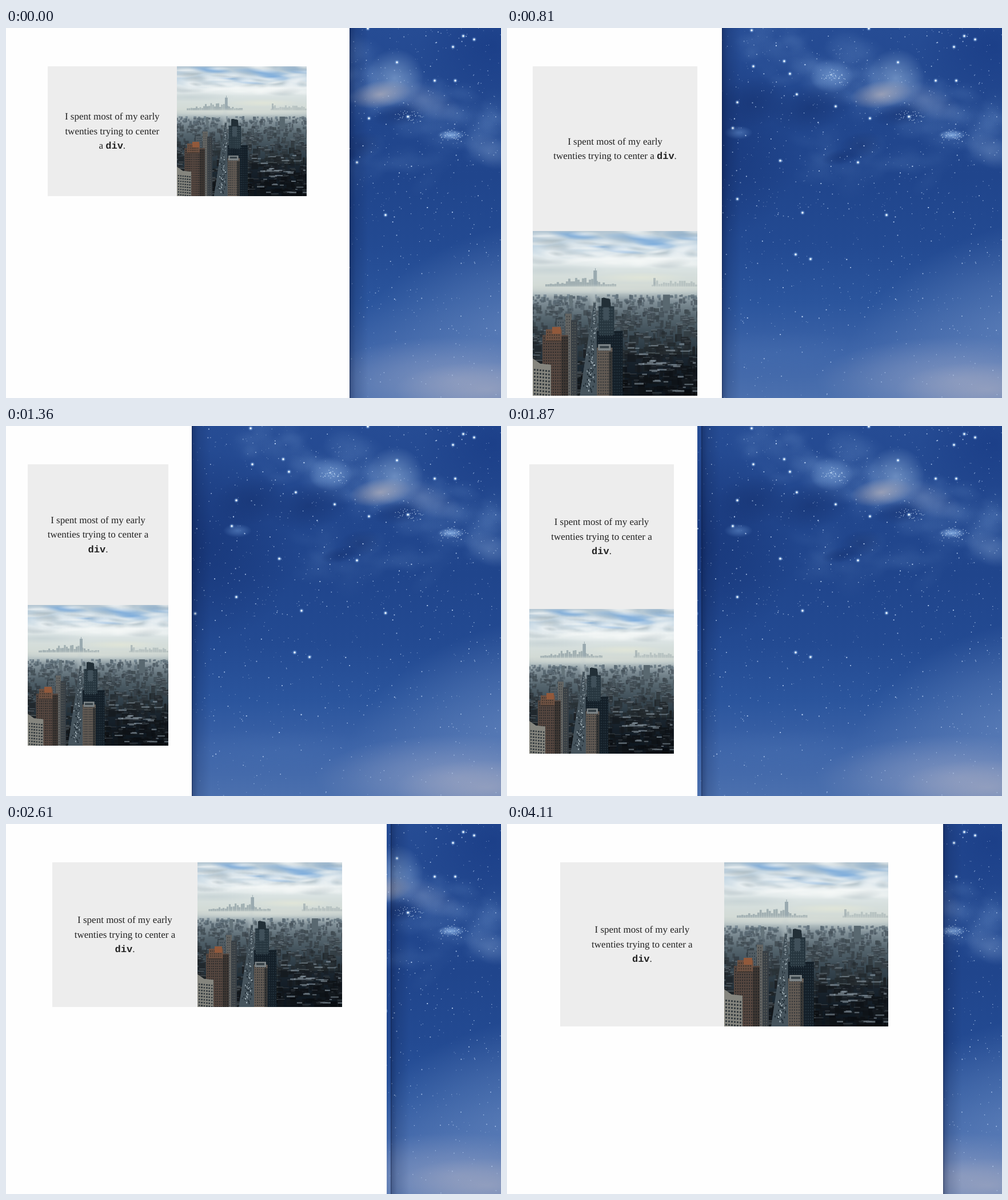
An HTML page with a canvas that plays this animation: 866 px wide and 647 px high, repeating every 4320 ms.

```html
<!DOCTYPE html>
<html lang="en">
<head>
<meta charset="utf-8">
<style>
  html, body { margin: 0; width: 100%; height: 100%; overflow: hidden; }
  #stage { position: relative; width: 866px; height: 647px; overflow: hidden; }
  #stage > *, #page > * { position: absolute; }
  #shadow {
    top: 0; width: 33px; height: 647px;
    background: linear-gradient(90deg, rgba(6,16,50,.65), rgba(6,16,50,.32) 2px, rgba(6,16,50,.14) 11px, transparent);
  }
  #page { left: 0; top: 0; height: 647px; overflow: hidden; background: #fefefe; }
  #card {
    display: flex; align-items: center; justify-content: center;
    background: #ededed; color: #222;
    font: 17px/25.5px "Liberation Serif", Times, serif;
    text-align: center; text-rendering: geometricPrecision;
  }
  #card p { margin: 0; width: 75%; }
  code { font: bold 17px/1 "Liberation Mono", Courier, monospace; }
  #track { top: 0; right: 0; width: 9px; height: 647px; background: #fafafa; border-left: 1px solid #e8e8e8; }
  #thumb { position: absolute; left: 2px; top: -4px; width: 6px; border-radius: 3px; background: #bcc2c2; }
</style>
</head>
<body>
<div id="stage">
  <canvas id="sky" width="866" height="647"></canvas>
  <div id="shadow"></div>
  <div id="page">
    <div id="card"><p>I spent most of my early twenties trying to center a <code>div</code>.</p></div>
    <canvas id="city" width="574" height="574"></canvas>
    <div id="track"><div id="thumb"></div></div>
  </div>
</div>
<script>
const $ = id => document.getElementById(id);

function seeded(s) {
  return () => (s = (s * 16807) % 2147483647) / 2147483647;
}

function fade(c, h, stops) {
  const g = c.createLinearGradient(0, 0, 0, h);
  stops.forEach(([y, color]) => g.addColorStop(y / h, color));
  return g;
}

// Soft ellipse; rgb is "r,g,b"
function glow(c, x, y, rx, ry, rgb, alpha, turn = 0) {
  const g = c.createRadialGradient(0, 0, 0, 0, 0, 1);
  g.addColorStop(0, `rgba(${rgb},${alpha})`);
  g.addColorStop(.5, `rgba(${rgb},${alpha * .55})`);
  g.addColorStop(1, `rgba(${rgb},0)`);
  c.save();
  c.translate(x, y);
  c.rotate(turn);
  c.scale(rx, ry);
  c.fillStyle = g;
  c.fillRect(-1, -1, 2, 2);
  c.restore();
}

function box(c, x, y, w, h, color) {
  c.fillStyle = color;
  c.fillRect(x, y, w, h);
}

function shape(c, color, ...p) {
  c.fillStyle = color;
  c.beginPath();
  for (let i = 0; i < p.length; i += 2) c.lineTo(p[i], p[i + 1]);
  c.fill();
}

function paintSky(c) {
  const rnd = seeded(77), spread = () => rnd() + rnd() - 1;
  box(c, 0, 0, 866, 647, fade(c, 647, [
    [0, "#264c94"], [130, "#22478e"], [260, "#20458c"], [380, "#234a92"],
    [480, "#2b559d"], [570, "#3d64a8"], [647, "#4b70ae"]]));
  glow(c, 340, 210, 170, 170, "20,48,112", .6);
  glow(c, 850, 30, 130, 100, "22,56,130", .6);

  // Milky way: puffs along a falling diagonal
  for (let i = 0; i < 150; i++) {
    const u = rnd();
    glow(c, 420 + u * 450, 20 + u * 170 + spread() * 65, 15 + rnd() * 35, 12 + rnd() * 22,
      "90,128,188", .07 + rnd() * .12, spread());
  }
  for (let i = 0; i < 30; i++)
    glow(c, 620 + spread() * 150, 225 + spread() * 50, 15 + rnd() * 30, 12 + rnd() * 25, "66,104,168", .16, spread());
  [[530, 140, 75, 42], [430, 130, 70, 45], [620, 205, 38, 24], [585, 225, 35, 14], [690, 150, 50, 22]]
    .forEach(([x, y, rx, ry]) => glow(c, x, y, rx, ry, "24,54,118", .75, -.2));
  glow(c, 568, 84, 38, 30, "140,178,228", .55);
  glow(c, 680, 88, 50, 52, "140,172,214", .65, .4);
  glow(c, 655, 116, 55, 24, "176,174,186", .75, -.15);
  glow(c, 730, 125, 75, 28, "128,145,185", .35, .4);
  glow(c, 779, 187, 24, 9, "150,190,240", .8);
  glow(c, 405, 183, 25, 12, "120,165,225", .45);
  glow(c, 845, 215, 45, 28, "110,140,190", .4, .5);

  // Haze near the horizon
  glow(c, 880, 520, 300, 170, "104,136,190", .65, -.35);
  glow(c, 790, 615, 250, 75, "140,156,194", .75);
  glow(c, 840, 632, 160, 48, "158,166,192", .7);
  glow(c, 470, 570, 200, 40, "72,112,176", .35);

  for (let i = 0; i < 2300; i++) {
    const x = rnd() * 866, y = rnd() * 647, size = .7 + rnd() * rnd() * 1.5;
    if (rnd() * 647 < (y - 280) * .95) continue;
    box(c, x, y, size, size, `rgba(205,226,255,${.25 + rnd() * .7})`);
  }
  for (let i = 0; i < 110; i++) {
    const k = i % 3;
    box(c, [568, 779, 705][k] + spread() * 28, [84, 187, 155][k] + spread() * 14, 1.2, 1.2, "rgba(215,235,255,.8)");
  }
  const bright = [
    633, 1, 431, 67, 403, 130, 575, 137, 395, 175, 517, 323, 478, 232, 403, 299, 505, 396, 531, 404,
    664, 327, 614, 235, 635, 158, 819, 20, 782, 33, 507, 116, 331, 328, 684, 60, 428, 4, 485, 58,
    703, 155, 750, 92, 800, 14, 786, 92, 495, 80];
  for (let i = 0; i < bright.length; i += 2) {
    const x = bright[i], y = bright[i + 1];
    glow(c, x, y, 4.5, 4.5, "160,205,255", .7);
    c.fillStyle = "#eef7ff";
    c.beginPath();
    c.arc(x, y, 1.7, 0, 7);
    c.fill();
  }
}

// A tower with rows of windows
function tower(c, x, y, w, h, wall, pane) {
  box(c, x, y, w, h, wall);
  for (let j = y + 4; j < y + h; j += 5)
    for (let i = x + 2; i < x + w - 2; i += 4) box(c, i, j, 2, 2.5, pane);
}

function paintCity(c) {
  const rnd = seeded(4242), spread = () => rnd() + rnd() - 1;
  c.scale(2, 2);
  box(c, 0, 0, 287, 287, fade(c, 287, [
    [0, "#b4c6d2"], [25, "#c3d6e4"], [50, "#e2eaec"], [75, "#d6dfdd"], [95, "#d3dbd6"],
    [108, "#b9c5c6"], [122, "#83929a"], [150, "#56666f"], [190, "#35444e"], [235, "#1d2a34"], [287, "#0e171f"]]));

  [[75, 8, 50, 8], [190, 14, 70, 9], [215, 24, 40, 7], [120, 26, 45, 6], [265, 8, 40, 9], [160, 36, 40, 4]]
    .forEach(([x, y, rx, ry]) => glow(c, x, y, rx, ry, "104,160,218", .8, .1));
  for (let i = 0; i < 70; i++) {
    const y = rnd() * 62;
    glow(c, rnd() * 287, y, 14 + rnd() * 28, 3 + rnd() * 6,
      rnd() < .3 ? "172,186,192" : "244,247,247", .35 + rnd() * .35, spread() * .2);
  }
  glow(c, 180, 52, 150, 14, "250,252,250", .75);
  glow(c, 30, 68, 100, 10, "186,200,204", .5);
  glow(c, 190, 81, 80, 9, "232,234,215", .6);

  // Skyline in the mist
  for (let x = 22; x < 145; x += 4) {
    const h = 4 + rnd() * 13 * Math.sin((x - 15) / 44) ** 2;
    box(c, x, 97 - h, 3.6, h, "rgba(140,157,163,.7)");
  }
  box(c, 106, 69, 6, 27, "#9aaab0");
  box(c, 108.5, 65, 1.2, 5, "#9aaab0");
  for (let x = 207; x < 287; x += 4) {
    const h = 3 + rnd() * 8;
    box(c, x, 97 - h, 3.6, h, "rgba(165,178,180,.6)");
  }
  box(c, 210, 82, 4, 14, "rgba(165,178,180,.8)");
  glow(c, 145, 101, 200, 9, "215,221,215", .85);

  // Rooftops growing towards the viewer
  for (let i = 0; i < 900; i++) {
    const d = i / 900, y = 110 + 172 * d ** 1.25, w = 3 + rnd() * (3 + 15 * d), h = 3 + rnd() * (5 + 15 * d);
    const x = rnd() * 300 - 10, v = 122 - 106 * d ** .6 + spread() * 17;
    box(c, x, y, w, h, `rgba(${v * .85},${v},${v * 1.1},.75)`);
    if (rnd() < .3) box(c, x, y, w, 1 + d, `rgba(165,182,192,${.4 - .1 * d})`);
    if (rnd() < .25) box(c, x + 1, y + 3, w * .7, 1, "rgba(150,165,175,.25)");
  }
  box(c, 227, 111, 12, 28, "#596870");
  box(c, 64, 112, 6, 20, "#65747b");
  box(c, 160, 215, 127, 72, "rgba(9,17,24,.35)");
  for (let i = 0; i < 34; i++)
    box(c, 155 + rnd() * 125, 195 + rnd() * 85, 5 + rnd() * 15, 1.5 + rnd() * 2, "rgba(150,165,175,.55)");

  // Avenue
  glow(c, 107, 125, 9, 35, "190,202,204", .5);
  shape(c, "#46545d", 106, 125, 110, 125, 113, 287, 82, 287);
  for (let i = 0; i < 110; i++) {
    const d = rnd(), y = 130 + 155 * d;
    box(c, 108 - 11 * d + spread() * (2 + 12 * d), y, 1 + d, 1.5 + 1.5 * d, rnd() < .45 ? "#a7b5bc" : "#202c34");
  }

  tower(c, 42, 154, 14, 60, "#525d64", "#39454d");
  tower(c, 57, 144, 11, 143, "#646563", "#46494b");
  tower(c, 67, 155, 11, 132, "#383f45", "#525654");
  tower(c, 17, 181, 45, 106, "#55463f", "#302e2e");
  tower(c, 23, 171, 28, 20, "#6d5142", "#45382f");
  box(c, 34, 167, 15, 12, "#92593b");
  box(c, 50, 183, 12, 104, "rgba(18,23,28,.35)");
  shape(c, "#85857e", 0, 222, 13, 231, 32, 233, 32, 287, 0, 287);
  for (let y = 240; y < 287; y += 6)
    for (let x = 2; x < 31; x += 5) box(c, x, y + x * .1, 3, 3, "#343b3f");

  tower(c, 112, 174, 45, 113, "#141f28", "#22303a");
  tower(c, 115, 131, 27, 50, "#27363f", "#3a4a53");
  shape(c, "#222f37", 120, 134, 120, 117, 124, 116, 135, 119, 136, 134);
  box(c, 123, 133, 10, 22, "#40505a");
  tower(c, 112, 203, 27, 84, "#625a53", "#383a3c");
  box(c, 114, 197, 22, 11, "#7c8487");
  box(c, 117, 200, 16, 4, "#394349");
  box(c, 133, 210, 6, 77, "rgba(15,22,28,.5)");
}

// time, shadow edge, page edge, layout width
const steps = [
  [0, 601], [90, 563], [300, 461], [480, 417], [660, 401], [810, 376, 376, 381], [960, 350, 350, 354],
  [1100, 331], [1250, 328], [1360, 325], [1480, 322], [1600, 320],
  [1870, 340, 333, 334], [1990, 425, 402, 402], [2110, 516, 489], [2260, 567, 560, 567],
  [2440, 614, 608, 615], [2610, 673, 666, 672], [2790, 734, 728, 734], [2970, 757], [3150, 763]];

function show(t) {
  const [, edge, page = edge, layout = page] = steps.findLast(s => s[0] <= t);
  const column = layout < 500, bar = column && layout > 430;
  const width = layout - (bar ? 11 : 0);
  const size = (width + 3) * (column ? .75 : .375);
  const left = width / 8 - 2.6;

  $("shadow").style.left = edge + "px";
  $("page").style.width = page + "px";
  const place = (el, x, y) => {
    Object.assign(el.style, { left: x + "px", top: y + "px", width: size + "px", height: size + "px" });
  };
  place($("card"), left, 67);
  place($("city"), left + (column ? 0 : size), 67 + (column ? size : 0));
  $("track").style.display = bar ? "block" : "none";
  $("thumb").style.height = 582 * 855 / (2 * size + 134) + "px";
}

paintSky($("sky").getContext("2d"));
paintCity($("city").getContext("2d"));
const start = performance.now();
function tick() {
  show((performance.now() - start) % 4320);
  requestAnimationFrame(tick);
}
tick();
</script>
</body>
</html>
```
